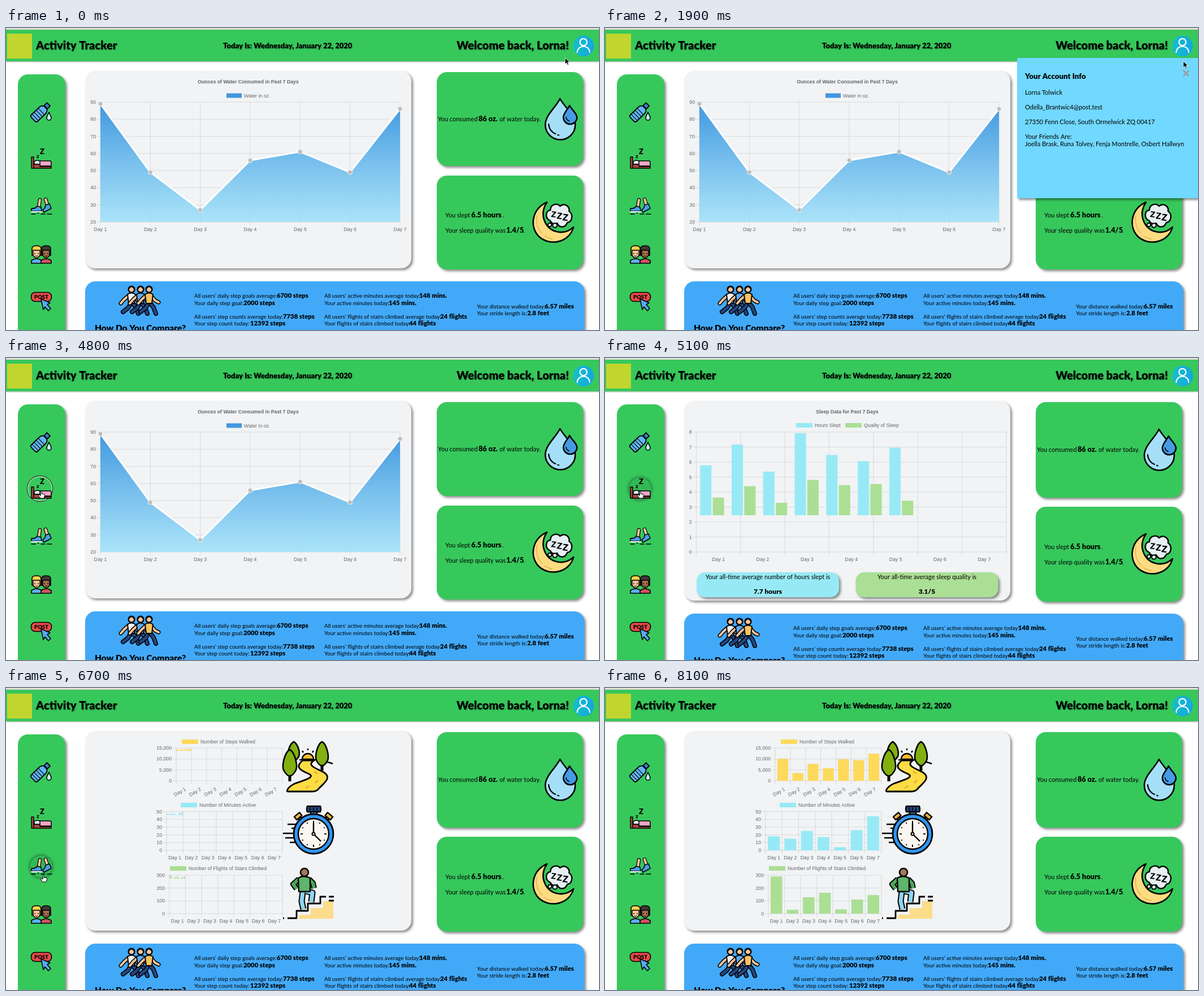
An HTML page with a canvas for the animation above (8200 ms loop, 1049 by 534 pixels).

```html
<!DOCTYPE html>
<html lang="en">
<head>
<meta charset="utf-8">
<title>Activity Tracker</title>
<style>
  html, body { margin: 0; width: 100%; height: 100%; overflow: hidden; background: #fff; }
  canvas { display: block; }
</style>
</head>
<body>
<canvas id="stage" width="1049" height="534"></canvas>
<script>
const ctx = document.getElementById('stage').getContext('2d');
const LOOP = 8200;
const GREEN = '#37c85c', CYAN = '#97eaf5', LIME = '#abdf95', YELLOW = '#fdd95c';
const SKIN = '#f8c49a', BLUE = '#4a9fe8', NAVY = '#26457d';
const SIDE_ICONS = [148, 231, 316, 400, 483];

// ---------- helpers ----------
const clamp = v => Math.max(0, Math.min(1, v));
const mix = (a, b, k) => a + (b - a) * k;
const easeOutQuart = u => 1 - (1 - clamp(u)) ** 4;

function shape(d, fill, width = 2, stroke = '#000') {
  const path = new Path2D(d);
  if (fill) { ctx.fillStyle = fill; ctx.fill(path); }
  if (width) { ctx.lineWidth = width; ctx.strokeStyle = stroke; ctx.stroke(path); }
}
function disc(x, y, r, fill, width = 2, stroke = '#000') {
  ctx.beginPath();
  ctx.arc(x, y, r, 0, 7);
  if (fill) { ctx.fillStyle = fill; ctx.fill(); }
  if (width) { ctx.lineWidth = width; ctx.strokeStyle = stroke; ctx.stroke(); }
}
function limb(d, width, color, edge = 3) {
  shape(d, null, width + edge);
  shape(d, null, width, color);
}
function rect(x, y, w, h, fill) {
  ctx.fillStyle = fill;
  ctx.fillRect(x, y, w, h);
}
function card(x, y, w, h, r, fill) {
  ctx.save();
  ctx.shadowColor = 'rgba(0,0,0,.45)';
  ctx.shadowOffsetX = ctx.shadowOffsetY = 3;
  ctx.shadowBlur = 4;
  ctx.fillStyle = fill;
  ctx.beginPath();
  ctx.roundRect(x, y, w, h, r);
  ctx.fill();
  ctx.restore();
}
function text(s, x, y, font, color = '#000', align = 'left') {
  ctx.font = font;
  ctx.fillStyle = color;
  ctx.textAlign = align;
  ctx.fillText(s, x, y);
}
const plain = size => `400 ${size}px Lato, sans-serif`;
const heavy = size => `900 ${size}px Lato, sans-serif`;
const chartFont = '8.75px "Liberation Sans", Arial, sans-serif';
const label = (s, x, y, align = 'center') => text(s, x, y + 3, chartFont, '#666', align);

function at(x, y, angle, draw) {
  ctx.save();
  ctx.translate(x, y);
  ctx.rotate(angle);
  draw();
  ctx.restore();
}
function stat(x, y, words, boldX, value, size = 9.9, boldSize = 11.3) {
  text(words, x, y, plain(size));
  text(value, boldX, y, heavy(boldSize));
}

// ---------- charts ----------
function gridLine(x1, y1, x2, y2) {
  ctx.beginPath();
  ctx.moveTo(x1, y1);
  ctx.lineTo(x2, y2);
  ctx.lineWidth = 1;
  ctx.strokeStyle = 'rgba(0,0,0,.1)';
  ctx.stroke();
}
function legend(x, y, color, s, width = 29) {
  rect(x, y - 4, width, 8, color);
  label(s, x + width + 4, y, 'left');
}
function yAxis({ x, y, w, h, min = 0, max, step }) {
  for (let v = min; v <= max; v += step) {
    const ty = y + h * (max - v) / (max - min);
    gridLine(x - 6, ty, x + w, ty);
    label(v.toLocaleString('en-US'), x - 8, ty, 'right');
  }
}
function barChart(c, grow) {
  const { x, y, w, h, max, sets, tilt } = c;
  const slot = w / 7, barW = slot * .8 / sets.length;
  const kx = mix(.06, 1, grow), ky = grow;
  yAxis(c);
  for (let i = 0; i <= 7; i++) {
    gridLine(x + slot * i, y, x + slot * i, y + h + 6);
    if (i === 7) break;
    const cx = x + slot * (i + .5);
    if (tilt) at(cx + 3, y + h + 14, -.52, () => label('Day ' + (i + 1), 0, 0, 'right'));
    else label('Day ' + (i + 1), cx, y + h + 13);
  }
  sets.forEach(({ color, data }, k) => data.forEach((v, i) => {
    const left = slot * (i + .1) + barW * (k + .05), tall = h * v / max;
    rect(x + left * kx, y + (h - tall) * ky, barW * .9 * kx, tall * ky, color);
  }));
}
function waterChart() {
  const box = { x: 167, y: 131, w: 530, h: 212, min: 20, max: 90, step: 10 };
  text('Ounces of Water Consumed in Past 7 Days', 428.5, 98, 'bold ' + chartFont, '#666', 'center');
  legend(390, 119.5, '#4397e0', 'Water in oz.', 27);
  yAxis(box);
  const points = [89, 49, 27, 56, 61, 49, 86].map((v, i) =>
    [box.x + box.w * i / 6, box.y + box.h * (90 - v) / 70]);
  points.forEach(([x], i) => {
    gridLine(x, box.y, x, box.y + box.h + 6);
    label('Day ' + (i + 1), x, 356);
  });
  const line = 'M' + points.map(p => p.join(' ')).join('L');
  const shade = ctx.createLinearGradient(0, 131, 0, 343);
  shade.addColorStop(0, 'rgba(54,146,222,.95)');
  shade.addColorStop(1, 'rgba(158,225,250,.85)');
  shape(line + 'V343H167Z', shade, 0);
  shape(line, null, 3, '#fff');
  points.forEach(([x, y]) => disc(x, y, 4, '#bdbdbd', 1, '#f4f4f4'));
}
function sleepChart(grow) {
  text('Sleep Data for Past 7 Days', 428.5, 98, 'bold ' + chartFont, '#666', 'center');
  legend(338, 119, CYAN, 'Hours Slept');
  legend(425, 119, LIME, 'Quality of Sleep');
  barChart({
    x: 161.5, y: 131, w: 548.5, h: 212, max: 8, step: 1,
    sets: [{ color: CYAN, data: [4.8, 6.8, 4.2, 7.9, 5.8, 5.2, 6.5] },
           { color: LIME, data: [1.7, 2.8, 1.2, 3.4, 2.9, 3, 1.4] }]
  }, grow);
  const pill = (x, color, words, value) => {
    card(x, 379, 252, 44, 15, color);
    text(words, x + 126, 391, plain(11), '#000', 'center');
    text(value, x + 126, 417, heavy(12), '#000', 'center');
  };
  pill(162, CYAN, 'Your all-time average number of hours slept is', '7.7 hours');
  pill(443.5, LIME, 'Your all-time average sleep quality is', '3.1/5');
}
function activityCharts(grow) {
  legend(311, 95, YELLOW, 'Number of Steps Walked');
  barChart({ x: 301, y: 106, w: 188, h: 58, max: 15000, step: 5000, tilt: true,
    sets: [{ color: YELLOW, data: [10000, 3500, 7700, 5700, 9800, 9400, 12392] }] }, grow);
  legend(309, 207, CYAN, 'Number of Minutes Active');
  barChart({ x: 284, y: 218.5, w: 205, h: 68.5, max: 50, step: 10,
    sets: [{ color: CYAN, data: [18, 15, 25, 17, 4, 26, 44] }] }, grow);
  legend(290, 319, LIME, 'Number of Flights of Stairs Climbed');
  barChart({ x: 289, y: 331, w: 200, h: 68, max: 300, step: 100,
    sets: [{ color: LIME, data: [290, 30, 128, 163, 33, 110, 145] }] }, grow);
  trailIcon();
  stopwatchIcon();
  stairsIcon();
}

// ---------- large icons ----------
function tree(x, top, rx, bottom) {
  const mid = mix(top, bottom, .62);
  shape(`M${x} ${bottom - 6}V${bottom + 11}`, null, 5);
  shape(`M${x} ${top}C${x + rx * .8} ${top + 4} ${x + rx * 1.3} ${mid} ${x + rx} ${mid + 8}
    Q${x} ${bottom + 12} ${x - rx} ${mid + 8}C${x - rx * 1.3} ${mid} ${x - rx * .8} ${top + 4} ${x} ${top}Z`, '#82b011', 2.6);
}
function trailIcon() {
  shape('M519 127H555M558 130Q569 130 578 134', null, 2.6);
  shape('M524 126A10 10 0 0 1 544 126Z', '#fcbf35', 2.4);
  shape('M534 107V110M524 111L526 114M544 111L542 114', null, 2.4);
  tree(509, 95, 9, 124);
  tree(559, 95, 10, 135);
  shape('M525 128H545C530 137 551 143 562 149C577 158 563 168 554 177Q550 183 542 183H499C494 183 500 174 511 169C527 163 548 158 536 152C519 145 511 139 525 128Z', '#fddc45', 2.8);
  shape('M545 148L551 151M552 163L547 168M536 173L530 177', null, 2, '#d9a528');
  tree(502, 109, 11, 154);
}
function stopwatchIcon() {
  at(517, 227, -.7, () => shape('M-6 -4H6V3H-6ZM-3 3V9H3V3', '#f0b544', 2.4));
  at(571, 227, .7, () => shape('M-6 -4H6V3H-6ZM-3 3V9H3V3', '#f0b544', 2.4));
  shape('M539 217H550V226H539Z', BLUE, 2.4);
  shape('M533 209H556Q558 214 556 219H533Q531 214 533 209Z', NAVY, 2.4);
  shape('M538 211V217M544 211V217M550 211V217', null, 1.5);
  shape('M498 241H515M505 248H512M490 257H511M494 265H512M502 273H516', null, 2.5);
  disc(544, 258, 35, '#2f96f2', 2.8);
  disc(544, 258, 27, '#fbf6ef', 2.4);
  for (let i = 0; i < 12; i++)
    at(544, 258, i * Math.PI / 6, () => shape(`M0 -23V${i % 3 ? -21 : -19}`, null, 2));
  shape('M544 239V258L557 271', null, 2.4);
  disc(544, 258, 2.5, '#fff', 2);
}
function stairsIcon() {
  shape('M518 408V401H539V389H561V377H579V408Z', '#fbdd8a', 0);
  shape('M490 407H492M498 407H514V394H534V381H556V369H566M571 369H580M571 376H580', null, 2.8);
  limb('M525 361L523 377L526 391', 7, '#8fd4f4', 4);
  limb('M530 359L542 362L540 378', 7, '#8fd4f4', 4);
  limb('M518 338L508 347L514 355', 6, '#4fa45b', 4);
  limb('M536 338L543 345L545 354', 6, '#4fa45b', 4);
  shape('M517 336Q527 330 538 336V360H518Z', '#5fb56b', 2.4);
  disc(528, 326, 7, '#a5775a', 2.6);
}
function dropsIcon() {
  shape('M980 125C973 140 954 154 954 171A26.5 26.5 0 0 0 1007 171C1007 154 988 140 980 125Z', '#a5dff7', 2.6);
  shape('M960 170A19 19 0 0 0 972 187M976 189L978 189.5', null, 2.2);
  shape('M997 137C993 145 986 151 986 158A12 12 0 0 0 1010 158C1010 151 1001 145 997 137Z', '#469ae5', 2.6);
  shape('M991 158A6 6 0 0 0 996 164', null, 1.8);
}
function moonIcon() {
  shape('M957 308C930 320 926 351 942 368C960 386 996 381 1004 352C988 367 962 363 953 342C947 328 951 317 957 308Z', '#fddb80', 2.6);
  shape('M939 332Q936 350 948 363M953 368Q959 372 966 373', null, 1.8, '#e5b85b');
  shape('M963 341C952 336 955 322 963 322C963 311 976 309 980 315C988 308 998 316 996 324C1004 329 1002 343 993 344C989 354 979 354 975 345C970 348 965 346 963 341Z', '#e7eff2', 2.4);
  disc(962, 348, 3.2, '#e7eff2', 2);
  disc(971, 349, 3.8, '#e7eff2', 2);
  [[964, 334, 14], [974, 337, 15], [984, 340, 16]].forEach(([x, y, size]) =>
    at(x, y, .12, () => text('Z', 0, 0, heavy(size))));
}
function walkersIcon() {
  [['#f4f4f4', 222], ['#5aaaf0', 238], ['#f6c163', 253]].forEach(([shirt, x]) => {
    limb(`M${x} 485L${x - 6} 495L${x - 15} 502`, 5, NAVY);
    limb(`M${x + 1} 485L${x + 8} 494L${x + 12} 505`, 5, NAVY);
    limb(`M${x - 5} 473L${x - 13} 480L${x - 19} 487`, 4, SKIN);
    limb(`M${x + 4} 474L${x + 11} 482L${x + 17} 485`, 4, SKIN);
    shape(`M${x - 7} 471Q${x} 466 ${x + 7} 471L${x + 5} 487H${x - 5}Z`, shirt, 2);
    disc(x, 462, 5.5, SKIN, 2.2);
    shape(`M${x - 5} 461Q${x} 453 ${x + 5} 461`, null, 2.4);
  });
}

// ---------- sidebar icons ----------
function bottleIcon() {
  at(61, 149, .8, () => {
    shape('M-8 -5Q-8 -9 -4 -12H4Q8 -9 8 -5V14Q8 18 5 18H-5Q-8 18 -8 14Z', '#62b4f2', 1.8);
    shape('M-8 -2H8M-8 3H8M-8 8H8M-8 13H8', null, 1.2);
    shape('M-4 -20H4V-13H-4Z', '#3b82d0', 1.8);
  });
  shape('M76 149C74 154 72 156 72 159A4 4 0 0 0 80 159C80 156 78 154 76 149Z', '#c7f0fa', 1.6);
}
function bedIcon() {
  text('z', 54, 230, heavy(10));
  text('Z', 60, 223, heavy(13));
  shape('M50 236Q56 232 61 236V241H50Z', '#dfeefa', 1.5);
  shape('M60 235H78Q80 235 80 238V244H60Z', '#f4a7c5', 1.5);
  shape('M45 228H49V248H45ZM49 241H60V245H80V248H49Z', '#a7483f', 1.4);
}
function shoesIcon() {
  limb('M60 304L58 317', 4, SKIN, 2.5);
  limb('M70 303L74 315', 4, SKIN, 2.5);
  shape('M45 319Q52 320 55 315L62 317L63 324H45Z', BLUE, 1.6);
  shape('M45 325H63', null, 2, '#fff');
  shape('M65 321Q70 319 70 313L77 311L80 319L67 326Z', BLUE, 1.6);
  shape('M45 329H52M56 327H58M62 329H69M73 329H81', null, 1.6);
}
function friendsIcon() {
  [[54, '#f7d14d', SKIN, '#5cb1f4'], [71, '#403838', '#a56d4b', '#cf5360']].forEach(([x, hair, face, shirt]) => {
    shape(`M${x - 9} 416V411Q${x} 405 ${x + 9} 411V416Z`, shirt, 1.6);
    shape(`M${x - 8} 402V390Q${x - 8} 385 ${x} 385Q${x + 8} 385 ${x + 8} 390V402Z`, hair, 1.6);
    shape(`M${x - 6} 393H${x + 6}V402Q${x} 411 ${x - 6} 402Z`, face, 1.4);
    disc(x - 3, 399, .9, '#000', 0);
    disc(x + 3, 399, .9, '#000', 0);
    shape(`M${x - 2} 403Q${x} 405 ${x + 2} 403`, null, 1);
  });
}
function postIcon() {
  ctx.beginPath();
  ctx.roundRect(44.5, 467.5, 36, 16, 7);
  ctx.fillStyle = '#e34b48';
  ctx.fill();
  ctx.lineWidth = 1.6;
  ctx.strokeStyle = '#000';
  ctx.stroke();
  text('POST', 62.5, 479, heavy(9.5), '#000', 'center');
  shape('M62 479L78 486L73 489L79 496L75 500L69 493L66 498Z', '#55aaf5', 1.6);
}

// ---------- page ----------
function hoverDisc(y, pressed) {
  if (pressed) {
    disc(60, y, 22, GREEN, 2.6, '#9fe0ad');
    disc(60, y, 22.8, null, 1.2, '#1d3a26');
    return;
  }
  ctx.save();
  ctx.shadowColor = 'rgba(0,0,0,.65)';
  ctx.shadowBlur = 6;
  disc(62, y, 19.5, '#31b955', 0);
  ctx.restore();
}
function header() {
  rect(0, 0, 1049, 3, '#e4e2d8');
  ctx.save();
  ctx.shadowColor = 'rgba(0,0,0,.35)';
  ctx.shadowOffsetY = 1;
  ctx.shadowBlur = 2;
  rect(0, 3, 1049, 56, GREEN);
  ctx.restore();
  rect(2, 10, 44, 44, '#c0d62f');
  ctx.save();
  ctx.shadowColor = 'rgba(0,0,0,.3)';
  ctx.shadowOffsetX = ctx.shadowOffsetY = 1;
  ctx.shadowBlur = 2;
  text('Activity Tracker', 53, 38, heavy(20));
  text('Today Is: Wednesday, January 22, 2020', 384, 35.5, heavy(13));
  text('Welcome back, Lorna!', 797, 38, heavy(20));
  ctx.restore();
  const teal = ctx.createLinearGradient(1003, 0, 1040, 0);
  teal.addColorStop(0, '#16c0c4');
  teal.addColorStop(1, '#12a5e4');
  disc(1021.5, 32, 18.5, teal, 0);
  disc(1021.5, 25, 6.2, null, 2.2, '#fff');
  shape('M1010.5 43C1011 29 1032 29 1032.5 43', null, 2.2, '#fff');
}
function sideCards(s) {
  card(762, 78, 259, 166 + 3 * s, 18, GREEN);
  card(762, 261 + 2 * s, 259, 166 + 2 * s, 18, GREEN);
  stat(764, 165 + s, 'You consumed', 836, '86 oz.', 11, 12.6);
  text('of water today.', 873, 165 + s, plain(11));
  stat(777, 334.5 + 3 * s, 'You slept', 823, '6.5 hours', 11, 12.8);
  text('.', 878, 334.5 + 3 * s, plain(11));
  stat(777, 361.5 + 3 * s, 'Your sleep quality was', 885, '1.4/5', 11, 12.6);
  text('.', 915, 361.5 + 3 * s, plain(11));
  at(0, s, 0, dropsIcon);
  at(0, 3 * s, 0, moonIcon);
}
function compareSection() {
  card(140, 448, 883, 120, 18, '#42a9f8');
  walkersIcon();
  text('How Do You Compare?', 157, 536, heavy(15.5));
  stat(333, 477, 'All users’ daily step goals average:', 479, '6700 steps');
  stat(333, 489.5, 'Your daily step goal:', 420, '2000 steps');
  stat(333, 514, 'All users’ step counts average today:', 490, '7738 steps');
  stat(333, 526, 'Your step count today:', 432, '12392 steps');
  stat(563, 477, 'All users’ active minutes average today:', 731, '148 mins.');
  stat(563, 489.5, 'Your active minutes today:', 677, '145 mins.');
  stat(563, 514, 'All users’ flights of stairs climbed average today:', 768, '24 flights');
  stat(563, 526, 'Your flights of stairs climbed today:', 713, '44 flights');
  stat(833, 495.5, 'Your distance walked today:', 953, '6.57 miles');
  stat(833, 508, 'Your stride length is:', 922, '2.8 feet');
}
function accountPanel() {
  card(729, 53, 330, 248, 0, '#71d8ff');
  shape('M1024 76L1032 84M1032 76L1024 84', null, 3, '#9a9fa3');
  text('Your Account Info', 743, 90, heavy(13.3));
  ['Lorna Tolwick', 'Odella_Brantwic4@post.test', '27350 Fenn Close, South Ormelwick ZQ 00417', 'Your Friends Are:']
    .forEach((s, i) => text(s, 743, 117.5 + 26.2 * i, plain(11)));
  text('Joella Brask, Runa Tolvey, Fenja Montrelle, Osbert Hallwyn', 743, 209, plain(11));
}

// ---------- pointer ----------
const PATH = [
  [0, 989, 53], [100, 989, 53], [400, 1019, 28], [1350, 1019, 28], [1500, 1020, 42], [1650, 1020, 42],
  [1900, 1023, 59], [2300, 1028, 80], [2450, 1028, 80], [3300, 44, 172], [3900, 60, 150], [4150, 60, 150],
  [4700, 62, 236], [5950, 62, 236], [6600, 66, 331], [7150, 66, 331], [7700, 572, 482], [8100, 604, 540], [8200, 604, 540]
];
function pointerAt(t) {
  const i = PATH.findIndex(key => key[0] > t);
  const [t0, x0, y0] = PATH[i - 1], [t1, x1, y1] = PATH[i];
  const k = (t - t0) / (t1 - t0);
  return { x: mix(x0, x1, k), y: mix(y0, y1, k) };
}
const near = (p, x, y, r) => Math.hypot(p.x - x, p.y - y) < r;

function pointer({ x, y }, hand) {
  at(x, y, 0, () => {
    if (hand) shape('M-1 0Q0 -2 1 0V4L6 5Q7 6 6 9L5 12H-1L-5 7Q-4 5 -1 7Z', '#fff', 1);
    else shape('M0 0V11L2.6 8.6L4.5 12.5L6.4 11.6L4.6 7.8H8Z', '#000', .8, '#fff');
  });
}

// ---------- frame ----------
function draw(t) {
  const view = t < 4900 ? 0 : t < 6700 ? 1 : 2;
  const shift = view ? 1 : 0;
  const panelOpen = t >= 700 && t < 2500;
  const pressed = (t >= 4700 && t < 4900) || t === 6600;
  const tip = pointerAt(t);
  ctx.lineJoin = ctx.lineCap = 'round';
  rect(0, 0, 1049, 534, '#fff');
  header();

  card(21, 82, 84, 500, 18, GREEN);
  const hovered = SIDE_ICONS.find(y => near(tip, 62, y, 21));
  if (hovered) hoverDisc(hovered, pressed);
  [bottleIcon, bedIcon, shoesIcon, friendsIcon, postIcon].forEach(icon => icon());

  card(140, 76, 577, 349 + 4 * shift, 18, '#f1f3f5');
  ctx.lineCap = 'butt';
  if (view === 0) waterChart();
  if (view === 1) sleepChart(easeOutQuart((t - 4844) / 1000));
  if (view === 2) activityCharts(easeOutQuart((t - 6677) / 1000));
  ctx.lineCap = 'round';

  sideCards(shift);
  at(0, 4 * shift, 0, compareSection);
  if (panelOpen) accountPanel();
  const overLink = hovered || near(tip, 1021, 32, 19) || (panelOpen && near(tip, 1028, 80, 6));
  pointer(tip, overLink);
}

function frame() {
  draw(Math.floor(performance.now() % LOOP / 100) * 100);
  requestAnimationFrame(frame);
}
frame();
</script>
</body>
</html>
```
